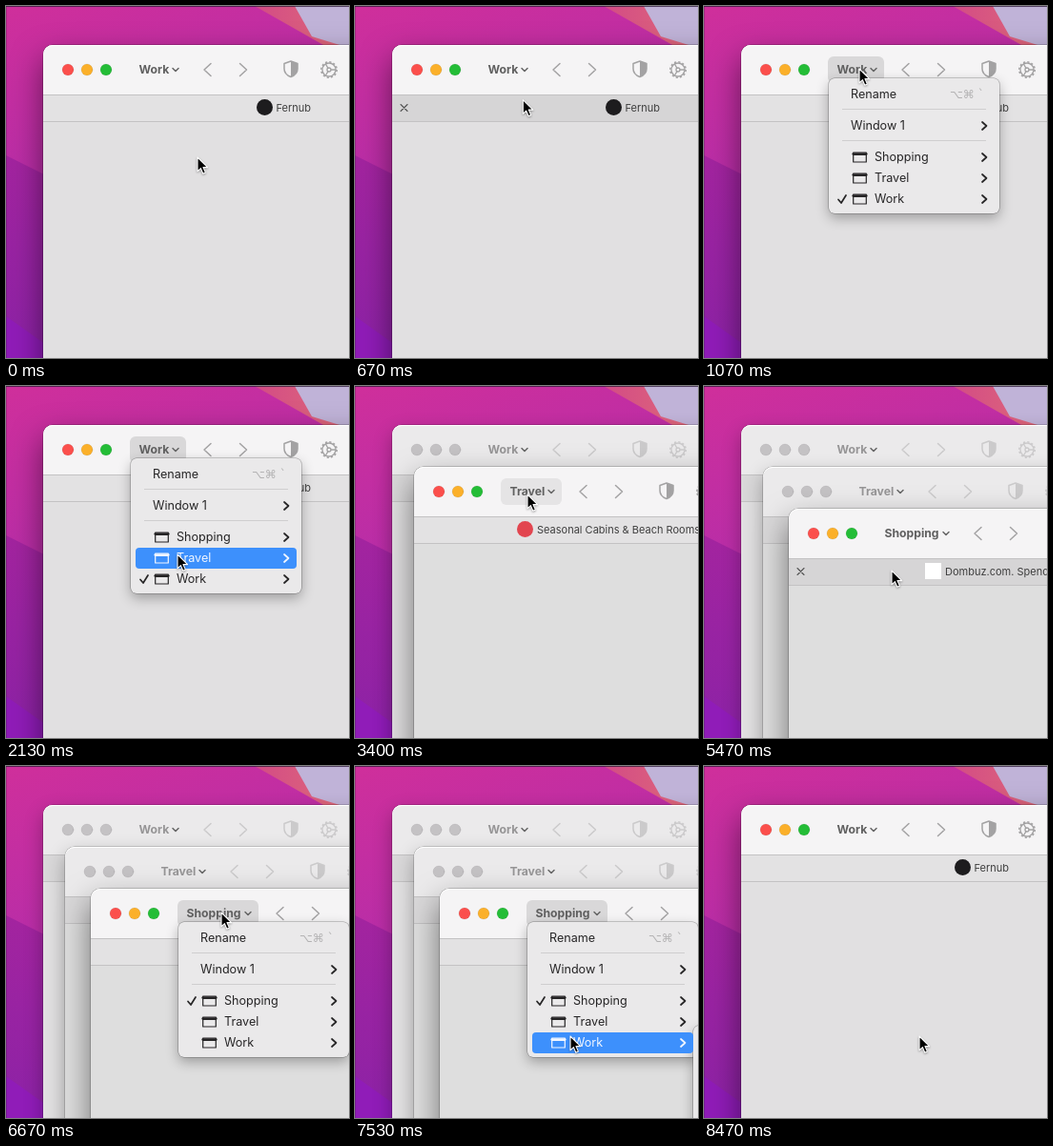
Write an HTML page that moves like this. It is 360 px wide and 370 px high and loops after 9.07 s.

```html
<!DOCTYPE html>
<html lang="en">
<head>
<meta charset="utf-8">
<title>Browser profiles</title>
<style>
html, body { margin: 0; width: 100%; height: 100%; overflow: hidden; }
#stage { position: relative; width: 360px; height: 370px; overflow: hidden; background: #c42fa2; font-family: Inter, "Liberation Sans", sans-serif; }
#stage svg { position: absolute; left: 0; top: 0; overflow: visible; }
.text { position: absolute; line-height: 20px; white-space: nowrap; }

.win { --ink: #606060; --icon: #a3a2a3; position: absolute; width: 900px; height: 600px; border-radius: 10px; transform-origin: 300px 250px;
  background: #dedede; box-shadow: 0 0 0 .5px rgba(0,0,0,.35), 0 14px 32px rgba(0,0,0,.5); }
.bar { position: absolute; width: 100%; height: 52px; border-radius: 10px 10px 0 0; background: #f5f4f5; box-shadow: inset 0 1px #fff; }
.tab { position: absolute; top: 52px; width: 100%; height: 27px; background: #e3e2e3; border: solid #c3c2c3; border-width: 1px 0; }
.pill { position: absolute; left: 91px; top: 12px; height: 28px; border-radius: 6px; }
.title { left: 100.5px; top: 16px; font-size: 12.2px; font-weight: 700; color: var(--ink); }
.label { top: 56px; font-size: 11px; color: #3f3f3f; }
.mark { position: absolute; top: 57px; width: 17px; height: 17px; }
.light { stroke: rgba(0,0,0,.12); stroke-width: .6; }
.cross { visibility: hidden; }
.hover .tab { background: #d6d5d6; }
.hover .cross { visibility: visible; }
.idle { --ink: #969596; --icon: #cbcacb; box-shadow: 0 0 0 .5px rgba(0,0,0,.3), 0 8px 20px rgba(0,0,0,.3); }
.idle .bar { background: #ebeaeb; }
.idle .tab { background: #d9d8d9; }
.idle .light { fill: #c4c2c4; }
.idle .label, .idle .mark { opacity: .5; }

.sheet { position: absolute; box-sizing: border-box; border-radius: 6px; background: #eae9ea;
  box-shadow: 0 0 0 .5px rgba(0,0,0,.35), 0 5px 13px rgba(0,0,0,.3); }
#menu { width: 179px; height: 142px; }
#sub { left: 174px; top: 109px; width: 160px; height: 120px; }
.row { position: absolute; left: 5px; width: 169px; height: 22px; border-radius: 4px; font-size: 12.6px; color: #262526; }
.row .text { top: 1px; }
.row .keys { left: 122px; font: 12px/20px "DejaVu Sans", sans-serif; color: #b3b2b3; }
.row.on { background: #3d90fc; color: #f1f6ff; }
.row.on .keys { color: #d3e5ff; }
.rule { position: absolute; left: 14px; width: 151px; height: 1px; background: #cfcecf; }
#cursor { filter: drop-shadow(0 1px 1px rgba(0,0,0,.35)); }
</style>
</head>
<body>
<div id="stage">
  <svg width="360" height="370">
    <defs>
      <linearGradient id="pink" x2=".3" y2="1"><stop stop-color="#cf2f9b"/><stop offset=".5" stop-color="#b72da8"/></linearGradient>
      <linearGradient id="coral"><stop stop-color="#d34b86"/><stop offset="1" stop-color="#df6b78"/></linearGradient>
      <linearGradient id="plum" x2="0" y2="1"><stop stop-color="#a3249f"/><stop offset="1" stop-color="#8c22a6"/></linearGradient>
    </defs>
    <path fill="url(#pink)" d="M0 0H360V370H0Z"/>
    <path fill="url(#coral)" d="M261 0H360V46H342Z"/>
    <path fill="#c0b3d8" d="M303 0H360V44L321 32Z"/>
    <path fill="url(#plum)" d="M0 157L60 187V370H0Z"/>
    <path fill="#901cb8" d="M0 326L60 369V370H0Z"/>
    <path fill="rgba(40,20,50,.7)" d="M0 0H360V1H0Z"/>
    <path fill="rgba(40,20,50,.25)" d="M0 0H1V370H0Z"/>
  </svg>
  <div id="windows"></div>
  <div id="menu" class="sheet"></div>
  <svg id="cursor" width="12" height="19">
    <path d="M0 0V14.8L3.4 11.6L5.8 17.2L8.4 16.1L6 10.6H10.6Z" fill="#000" stroke="#fff" stroke-width="1.1" stroke-linejoin="round"/>
  </svg>
</div>
<script>
const LOOP = 9070, STEP = 1000 / 15;
const $ = id => document.getElementById(id);

const profiles = [
  { name: 'Work', x: 39, y: 41, chev: 139, mark: 232, color: '#1d1c1e', round: '50%', page: '#e1e0e1', tab: 'Fernub' },
  { name: 'Travel', x: 62, y: 85, chev: 144, mark: 116.5, color: '#e2454f', round: '50%', page: '#dedede', tab: 'Seasonal Cabins &amp; Beach Rooms - Book' },
  { name: 'Shopping', x: 89, y: 129, chev: 165, mark: 151.5, color: '#fff', round: '0', page: '#dedede', tab: 'Dombuz.com. Spend less. Smile more.' }
];

// Toolbar glyphs, placed relative to the title chevron.
function toolbar(chev) {
  const lights = ['#fb4f4c', '#fbb02a', '#24bd37'].map((fill, i) =>
    `<circle class="light" cx="${26 + 20 * i}" cy="26" r="6" fill="${fill}"/>`).join('');
  return `<svg width="900" height="80" fill="none" stroke="var(--icon)" stroke-width="1.5" stroke-linecap="round" stroke-linejoin="round">
    ${lights}
    <path d="M${chev - 3} 24.5l3 3l3-3" stroke="#666"/>
    <path d="M${chev + 37} 19.5l-7 6.5l7 6.5M${chev + 67.5} 19.5l7 6.5l-7 6.5"/>
    <g transform="translate(${chev + 121} 25)">
      <path d="M0-8L7-5.5V0C7 4 4 7 0 8.5C-4 7-7 4-7 0V-5.5Z"/>
      <path d="M0-8L7-5.5V0C7 4 4 7 0 8.5Z" fill="var(--icon)" stroke="none"/>
    </g>
    <g transform="translate(${chev + 161} 26)" stroke-width="1.3">
      <circle r="7"/><circle r="8.2" stroke-width="1.6" stroke-linecap="butt" stroke-dasharray="2.15"/>
      <circle r="2"/><path d="M2 0H7M-1-1.7L-3.5-6M-1 1.7L-3.5 6"/>
    </g>
    <path class="cross" d="M9 62.5l7 7m0-7l-7 7" stroke="#555" stroke-width="1.1"/>
  </svg>`;
}

for (const p of profiles) {
  p.el = document.createElement('div');
  p.el.style.cssText = `left:${p.x}px;top:${p.y}px;background:${p.page}`;
  p.el.innerHTML = `<div class="bar"></div><div class="tab"></div>
    <div class="pill" style="width:${p.chev - 80}px"></div>
    <div class="text title">${p.name}</div>
    <div class="mark" style="left:${p.mark - 8.5}px;background:${p.color};border-radius:${p.round}"></div>
    <div class="text label" style="left:${p.mark + 12.5}px">${p.tab}</div>${toolbar(p.chev)}`;
  p.pill = p.el.querySelector('.pill');
  $('windows').append(p.el);
}

const items = [['Rename', 17], ['Window 1', 49.5], ['Shopping', 82.5], ['Travel', 104.5], ['Work', 126.5]];
const arrow = '<path d="M156 7l4.5 4l-4.5 4"/>';
const frame = '<path d="M20.7 6h13.6v10H20.7Z" stroke-width="1.2"/><path d="M20.7 7.6h13.6" stroke-width="2.6"/>';
const check = '<path class="check" d="M5 11.5l3 3.5l5-8"/>';

$('menu').innerHTML = '<div id="sub" class="sheet"></div><div class="rule" style="top:32px"></div><div class="rule" style="top:65px"></div>' +
  items.map(([name, y], i) => `<div class="row" style="top:${y - 11}px">
    <svg width="169" height="22" fill="none" stroke="currentColor" stroke-width="1.7" stroke-linecap="round" stroke-linejoin="round">
      ${i ? arrow : ''}${i > 1 ? frame + check : ''}</svg>
    <span class="text" style="left:${i > 1 ? 43 : 18}px">${name}</span>
    ${i ? '' : '<span class="text keys">⌥⌘ `</span>'}</div>`).join('');
const rows = [...document.querySelectorAll('.row')];

// Pointer moves: start, end, target x, target y.
const start = [201, 159];
const moves = [
  [267, 933, 163, 66], [1067, 1867, 180, 177], [2867, 3400, 181, 114],
  [4067, 4600, 197, 194], [5733, 6200, 226, 154], [6867, 7467, 226, 284]
];
// Menus: owner, opening time, click time.
const menus = [[0, 1066, 2000], [1, 3866, 4800], [2, 6600, 8066]];

const ramp = (t, a, b) => Math.min(1, Math.max(0, (t - a) / (b - a)));
const smooth = k => k * k * (3 - 2 * k);

function pointer(t) {
  let [x, y] = start;
  for (const [a, b, tx, ty] of moves) {
    const k = smooth(ramp(t, a, b));
    x += (tx - x) * k;
    y += (ty - y) * k;
  }
  return [x, y];
}

function drawMenu(t, open, y) {
  const menu = $('menu');
  menu.style.visibility = open ? 'visible' : 'hidden';
  if (!open) return;
  const [owner, , click] = open, p = profiles[owner];
  const blink = t >= click && t < click + 130;
  menu.style.left = p.x + 92 + 'px';
  menu.style.top = p.y + 35 + 'px';
  menu.style.opacity = 1 - ramp(t, click + 140, click + 340);
  rows.forEach((row, i) => {
    const dy = y - p.y - 35 - items[i][1];
    row.classList.toggle('on', !blink && dy >= -11 && dy < 11);
    const tick = row.querySelector('.check');
    if (tick) tick.style.display = items[i][0] === p.name ? '' : 'none';
  });
  $('sub').style.display = owner === 2 && t > 7460 && t < click ? '' : 'none';
}

function render(time) {
  const t = Math.floor((time % LOOP + 5) / STEP) * STEP + 1;
  const [x, y] = pointer(t);
  const open = menus.find(([, a, click]) => t >= a && t < click + 330);
  const opened = [0, 2266, 5066];
  const back = t > 8330;
  const active = back ? 0 : opened.filter(a => t >= a).length - 1;

  profiles.forEach((p, i) => {
    const front = i === active, dx = x - p.x, dy = y - p.y;
    const grow = i ? 1 - (1 - ramp(t, opened[i] - STEP, opened[i] + 200)) ** 2 : 1;
    const pressed = open && open[0] === i && t < open[2] + 200;
    const over = front && !open && dy > 12 && dy < 40 && dx > 91 && dx < p.chev + 11;
    p.el.className = 'win' + (front ? '' : ' idle') + (front && !open && dy > 52 && dy < 81 ? ' hover' : '');
    p.el.style.visibility = i <= active ? 'visible' : 'hidden';
    p.el.style.opacity = grow;
    p.el.style.transform = grow < 1 ? `scale(${0.75 + 0.25 * grow})` : 'none';
    p.pill.style.background = pressed ? '#d9d8d9' : over ? '#e5e4e5' : 'none';
  });

  drawMenu(t, open, y);
  $('cursor').style.transform = `translate(${x}px, ${y}px)`;
}

let origin;
function tick(now) {
  origin ??= now;
  render(now - origin);
  requestAnimationFrame(tick);
}
render(0);
requestAnimationFrame(tick);
</script>
</body>
</html>
```
